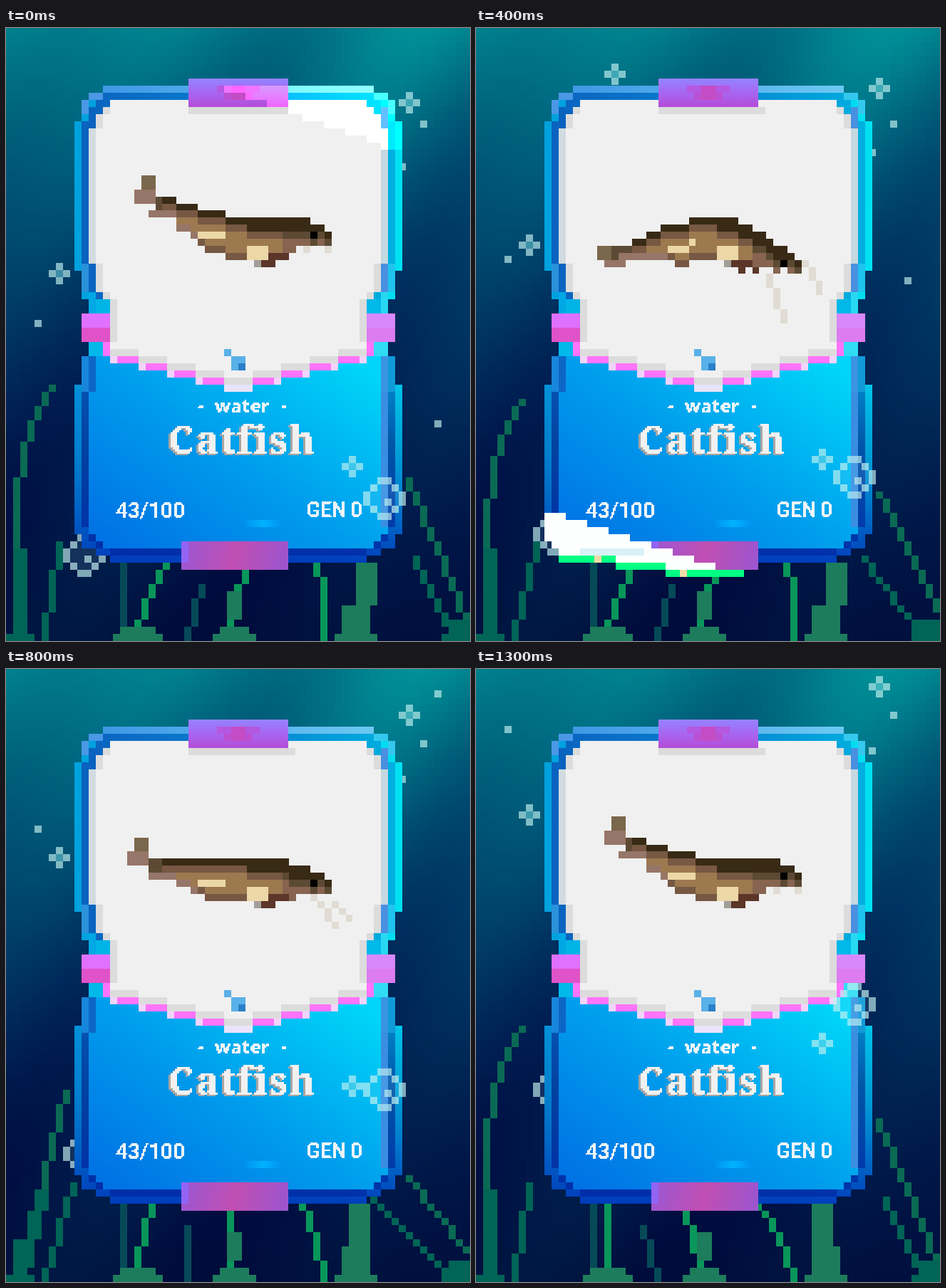
These frames come from a looping animation (651 by 861 pixels, 1.5 s). An HTML page with a canvas:

```html
<!DOCTYPE html>
<html lang="en">
<head>
<meta charset="utf-8">
<title>Catfish card</title>
<style>
html, body { margin: 0; width: 100%; height: 100%; overflow: hidden; background: #00204f; }
canvas { display: block; width: 651px; height: 861px; }
</style>
</head>
<body>
<canvas id="stage" width="651" height="861"></canvas>
<script>
const W = 651, H = 861, LOOP = 1500;
const g = document.getElementById('stage').getContext('2d');

// Grids: origin x, origin y, cell width, cell height
const SEA = [0, 0, W / 65, H / 86];
const CARD = [6, 1, 10, 10];
const FISH = [170, 207, 9.89, 9.89];

function box(c, grid, color, x, y, w = 1, h = 1) {
  const [ox, oy, cw, ch] = grid;
  const l = Math.round(ox + x * cw), t = Math.round(oy + y * ch);
  c.fillStyle = color;
  c.fillRect(l, t, Math.round(ox + (x + w) * cw) - l, Math.round(oy + (y + h) * ch) - t);
}

function line(grid, color, x0, y0, x1, y1) {
  const n = Math.max(Math.abs(x1 - x0), Math.abs(y1 - y0), 1);
  for (let k = 0; k <= n; k++) {
    box(g, grid, color, Math.round(x0 + (x1 - x0) * k / n), Math.round(y0 + (y1 - y0) * k / n));
  }
}

function layer(paint) {
  const cv = document.createElement('canvas');
  cv.width = W;
  cv.height = H;
  paint(cv.getContext('2d'));
  return cv;
}

function lin(c, x0, y0, x1, y1, ...colors) {
  const grad = c.createLinearGradient(x0, y0, x1, y1);
  colors.forEach((k, i) => grad.addColorStop(i / (colors.length - 1), k));
  return grad;
}

// Left side of a stepped outline in card cells, mirrored to the right
function outline(list) {
  const half = list.split(',').map(s => s.split(' ').map(Number));
  const left = [half[0]];
  for (let i = 1; i < half.length; i++) left.push([half[i - 1][0], half[i][1]], half[i]);
  const path = new Path2D();
  left.concat(left.map(([x, y]) => [64 - x, y]).reverse())
    .forEach(([x, y]) => path.lineTo(6 + x * 10, 1 + y * 10));
  path.closePath();
  return path;
}

const RIM = outline('13 8,11 9,10 10,9 13,10 34,11 38,10 40,11 44,10 46,9 50,10 71,12 73,14 74,14 75');
const INNER = outline('13 9,12 10,11 11,10 13,11 33,12 37,14 38,12 44,11 46,10 50,11 70,12 72,14 73,14 74');
const WATER = outline('14 44,13 45,12 46,12 50,11 51,11 70,12 71,13 72,14 73');
const PANEL = outline('14 10,13 11,12 12,11 14,12 33,13 37,14 38,14 45');

// Deep water with slanted rays
const sea = layer(c => {
  const wave = (t, period) => Math.cos((t - 570) / period * 2 * Math.PI);
  for (let y = 0; y < 86; y++) {
    const d = y / 85;
    for (let x = 0; x < 65; x++) {
      const t = x * 10 + y * 5.8;
      const ray = (wave(t, 330) + wave(t, 500)) / 2 * (1 - d * .65);
      const green = 16 + 106 * Math.pow(1 - d, 1.65) + ray * 21;
      const blue = 62 + 76 * Math.pow(1 - d, 1.2) + ray * 13;
      box(c, SEA, `rgb(0,${Math.round(Math.max(12, green))},${Math.round(blue)})`, x, y);
    }
  }
});

// Text set on coarse square dots
function dotText(c, str, x, y, font, size, dot, color, gap = 0, wordGap = 0) {
  const t = document.createElement('canvas').getContext('2d');
  const w = 160, h = 50, base = 32;
  t.canvas.width = w;
  t.canvas.height = h;
  t.font = font.replace('SIZE', size / dot + 'px');
  t.letterSpacing = gap / dot + 'px';
  t.wordSpacing = wordGap / dot + 'px';
  t.fillText(str, 4, base);
  const data = t.getImageData(0, 0, w, h).data;
  c.fillStyle = color;
  for (let i = 0; i < w * h; i++) {
    if (data[i * 4 + 3] > 100) {
      c.fillRect(x + (i % w - 4) * dot, y + (Math.floor(i / w) - base) * dot, dot, dot);
    }
  }
}

const card = layer(c => {
  const put = (...a) => box(c, CARD, ...a);
  const pair = (a, b, x, y, w = 1, h = 1) => {
    put(a, x, y, w, h);
    put(b, 64 - x - w, y, w, h);
  };
  const shade = (shape, color, dark) => {
    c.fillStyle = color;
    c.fill(shape);
    c.fillStyle = dark;
    c.fill(shape);
  };
  shade(RIM, lin(c, 96, 0, 556, 0, '#00a2de', '#00a2de', '#00e2f2'),
    lin(c, 0, 440, 0, 750, 'rgba(0,70,190,0)', 'rgba(0,95,190,.5)', 'rgba(0,55,185,.95)'));
  put(lin(c, 136, 0, 516, 0, '#3f98e6', '#6cc8f2'), 13, 8, 38, 1);
  shade(INNER, lin(c, 106, 0, 546, 0, '#0a62bf', '#0a80cf', '#00b0e0'),
    lin(c, 0, 430, 0, 741, 'rgba(0,50,160,0)', 'rgba(0,55,150,.75)', 'rgba(0,42,168,.95)'));

  const blue = '#4a98e6', aqua = '#35c8ee';
  pair(blue, aqua, 11, 9, 2);
  pair(blue, aqua, 10, 10, 1, 2);
  pair('#0a62bf', '#4a90e0', 11, 11, 1, 3);
  pair('#2a92da', '#20c4ee', 10, 33, 1, 4);
  pair('#00a8e4', '#28d8f2', 11, 37, 1, 3);
  pair('#00b4e6', '#00b8ea', 12, 38, 2, 2);
  pair('#00b8ea', '#30dcf4', 11, 44, 2, 2);

  c.fillStyle = lin(c, 190, 770, 430, 430, '#0070e4', '#009cec', '#00d4f8');
  c.fill(WATER);
  pair('#1886dc', '#109ad8', 10, 46, 1, 5);
  pair('#0d66c6', '#3a94e2', 11, 46, 1, 5);
  put('#3a8ee2', 52, 51, 1, 19);
  put(lin(c, 336, 0, 386, 0, '#0094f0', '#00b2ff', '#0094f0'), 33, 69, 5, 1);

  const white = '#f0f0f0', grey = '#dcdcdc', pink = '#ff74fa';
  c.fillStyle = white;
  c.fill(PANEL);
  pair('#d2dce0', '#c6d8e0', 11, 14, 1, 19);
  put('#4a90e0', 52, 33, 1, 4);
  pair(grey, grey, 12, 12, 1, 2);
  pair(grey, grey, 12, 33, 1, 4);
  pair(grey, grey, 13, 11);
  pair(grey, grey, 13, 37);
  pair(grey, grey, 14, 38, 1, 7);
  put(grey, 25, 11, 15, 1);

  // Stepped lower edge of the panel
  for (let x = 14; x < 32; x++) {
    const y = 45 + Math.min(4, Math.floor((x - 14) / 4));
    const trim = x > 29 ? '#e9e4fa' : x % 4 === 2 ? '#f2d4fb' : pink;
    pair(white, white, x, 44, 1, y - 44);
    pair(grey, grey, x, y);
    pair(trim, trim, x, y + 1);
  }
  pair(pink, pink, 13, 44, 1, 2);

  put('#5ab0e8', 30, 45);
  put('#5ab0e8', 31, 46, 2, 2);
  put('#2a80c8', 32, 47);

  pair('#e070ff', '#d888fb', 10, 40, 4, 2);
  pair('#e052c8', '#dc7cf0', 10, 42, 4, 2);
  put(lin(c, 0, 71, 0, 111, '#9484ff', '#a866f0', '#b44cd8'), 25, 7, 14, 4);
  put('#b458e0', 29, 8, 6, 1);
  put('#bb50d2', 30, 9, 4, 1);
  put('#c44cc4', 31, 8, 2, 2);
  put(lin(c, 246, 721, 396, 761, '#9a58d4', '#c04eb2', '#9a56d0'), 24, 72, 15, 4);
  put('#9264f4', 24, 72, 1, 3);
});

const words = layer(c => {
  const pale = '#eef4f8', serif = 'bold SIZE "Noto Serif", serif', plain = '500 SIZE Roboto, sans-serif';
  dotText(c, '- water -', 269, 540, 'bold SIZE "Noto Sans", sans-serif', 26, 2, pale, 0, 9);
  dotText(c, 'Catfish', 225, 600, serif, 54, 3, '#a9a5a2', 2);
  dotText(c, 'Catfish', 228, 598, serif, 54, 3, '#f1f1f1', 2);
  dotText(c, '43/100', 154, 688, plain, 30, 2, pale);
  dotText(c, 'GEN 0', 421, 687, plain, 30, 2, pale, -1);
});

const DEEP = '#0a6a54', BASE = '#006456', LEAF = '#08965a', MOSS = '#1d7c5c', DIM = '#064a58';

// A weed stands on the sea bed; its tip leans away from the root
function weed(root, top, lean, bend, thin, thick = thin) {
  const at = y => Math.round(root + lean * Math.pow(Math.max(0, 85 - y) / (85 - top), bend));
  for (let y = top; y < 86; y++) {
    const a = Math.min(at(y), at(y + 1) + 1), b = Math.max(at(y), at(y + 1) - 1);
    const low = y > 72 && thick !== thin;
    box(g, SEA, low ? thick : thin, a, y, b - a + (low ? 2 : 1));
  }
}

function clump(color, x, w, top) {
  box(g, SEA, color, x + 1, top, w - 1, 85 - top);
  box(g, SEA, color, x, 85, w + 1);
}

function garden(q, lean) {
  weed(16, 75, 0, 1, DIM);
  weed(25, 78, lean, 1, DIM);
  weed(1, Math.round(50 + 2.2 * q * q), 5 - 2 * q + 1.5 * q * q, 5 - q * q, DEEP, BASE);
  weed(5, 72, 2 + q, 1, BASE);
  weed(65 + q, 63 + 2 * q * q, -9 - q, 1, DEEP);
  weed(62, 74, -5 - 3 * q, 1, BASE);
  clump(BASE, 0, 3, 80);
  clump(BASE, 61, 4, 83);

  weed(18, 75, 2 + lean, 1.6, LEAF);
  weed(31, 76, lean, 1.6, LEAF);
  weed(44, 75, lean - 2.6, 1.3, LEAF);
  box(g, SEA, MOSS, 48 + Math.round(lean / 2), 75, 3, 6);
  box(g, SEA, MOSS, 31, 79, 2, 4);
  clump(MOSS, 15, 6, 84);
  clump(MOSS, 29, 5, 84);
  clump(MOSS, 46, 5, 81);
}

const dot = (x, y) => box(g, SEA, 'rgba(196,242,240,.66)', x, y);

function sparkle(x, y) {
  for (const s of [0, 2]) {
    dot(x + 1, y + s);
    dot(x + s, y + 1);
  }
  box(g, SEA, 'rgba(120,220,226,.5)', x + 1, y + 1);
}

function bubble(x, y) {
  box(g, SEA, 'rgba(190,240,250,.1)', x + 1, y + 1, 4, 4);
  for (let i = 0; i < 3; i++) {
    for (const a of [i, 5 - i]) {
      dot(x + a, y + 2 - i);
      dot(x + a, y + 3 + i);
    }
  }
  dot(x + 3, y + 3);
}

const DARK = '#382a15', BROWN = '#775843', TAN = '#9d7950', ROSE = '#967668', CREAM = '#ecd7a7',
  UMBER = '#5c4a34', FIN = '#5b3629', OLIVE = '#7b674c', ASH = '#a39d98', WISP = '#e0dcd4';

// rise: tail end of the back, drop and curve: head end, fluke: x and lift of the tail fin
const poses = [
  { rise: -3, drop: 2, curve: 4, fluke: [2, -3], wisps: [[25, 10, 25, 10], [28, 10, 28, 10]] },
  { rise: 3, drop: 6, curve: 1.3, fluke: [0, 1], wisps: [[24, 14, 26, 20], [29, 12, 31, 16]] },
  { rise: 0, drop: 3, curve: 2, fluke: [1, -3], wisps: [[26, 11, 29, 15], [29, 12, 31, 14]] }
];

function fish({ rise, drop, curve, fluke: [fx, lift], wisps }) {
  const back = x => Math.floor(6.4 + rise * Math.pow(Math.max(0, 16 - x) / 11, 1.5)
    + drop * Math.pow(Math.max(0, x - 18) / 10, curve));
  const girth = x => Math.round(1.9 + 4.5 * Math.sin((x - 3) / 26 * Math.PI));
  const put = (color, x, y, w, h) => box(g, FISH, color, x, y, w, h);
  const mark = (color, x, depth, w = 1) => {
    for (let i = x; i < x + w; i++) put(color, i, back(i) + depth);
  };

  const tail = back(5) + lift, side = lift < 0 ? -1 : 1;
  put(OLIVE, fx, tail, 2, 2);
  put(ROSE, fx + side, tail + 2, 3, side < 0 ? 2 : 1);
  put(UMBER, fx + 2, back(5) + (side > 0), 5 - fx - 2, 2);
  put(ROSE, 3, back(5) + 2, 3, 1);

  for (const w of wisps) line(FISH, WISP, ...w);
  for (let x = 5; x < 29; x++) {
    const n = girth(x), dark = x < 17 || x > 26 ? 1 : 2;
    for (let i = 0; i < n; i++) {
      let color = TAN;
      if (i < dark) color = DARK;
      else if (x > 21) color = i === dark ? UMBER : '#87644f';
      else if (i === n - 1) color = x < 10 ? ROSE : BROWN;
      else if (i === dark) color = BROWN;
      mark(color, x, i);
    }
  }
  mark(CREAM, 10, 3, 4);
  mark(CREAM, 17, 4, 3);
  mark(CREAM, 17, 5, 3);
  mark(FIN, 20, 5, 3);
  mark(FIN, 19, 6, 2);
  mark(ASH, 18, 6);
  put('#000', 26, back(27) + 1);
}

// Diagonal band of light running down the card
function shine(step) {
  if (step > 3) return;
  g.save();
  g.clip(RIM);
  g.globalCompositeOperation = 'color-dodge';
  for (let x = 9; x < 55; x++) {
    const low = Math.round(12 + 18.5 * step + (x - 39.4) * .36);
    box(g, CARD, '#404040', x, low - 14, 1, 14);
  }
  g.restore();
}

// The band leaves past the lower left corner
function splash() {
  for (let x = 9; x < 37; x++) {
    const top = 68 + Math.floor((x - 9) * .34);
    const end = Math.floor(Math.min(63 + x, 74 + (x - 11) * .14, 76));
    if (end > top) box(g, CARD, '#fdfefe', x, top, 1, end - top);
    if (x > 13 && x < 23) box(g, CARD, '#d8f2f6', x, 73);
    if (x > 10) box(g, CARD, x % 12 === 4 ? '#f0dca8' : '#00ff82', x, end);
  }
}

// Rising things gain speed with each beat
const rise = (y, speed, gain, n) => Math.round(y - speed * n - gain * n * n);

function draw(step) {
  const beat = Math.floor(step / 3), slow = Math.floor(step / 5);
  const pose = 2 - Math.abs(2 - beat);
  const skip = step > 11 ? 1 : 0;
  g.drawImage(sea, 0, 0);
  garden(pose, 2 - 2 * slow);

  sparkle(6, 33 - step - skip);
  sparkle(55, 9 - 2 * beat);
  if (step < 7) sparkle(18, 13 - 2 * step);
  dot(55, 19 - 2 * beat);
  dot(58, 13 - Math.floor(3.5 * slow));
  dot(4, rise(41, 2, .04, Math.min(13, step + skip)));
  dot(60, rise(55, 3.4, .38, step));
  bubble(8, rise(71, 2.6, .3, beat));

  g.drawImage(card, 0, 0);
  shine(step);
  fish(poses[pose]);
  g.drawImage(words, 0, 0);
  if (step === 4) splash();
  sparkle(47, rise(60, .8, .37, beat));
  bubble(50, rise(63, 2.3, .6, beat));
}

const start = performance.now();
let shown = -1;
function tick(now) {
  const t = Math.max(0, now - start) % LOOP;
  const step = Math.min(13, Math.floor(t / 100));
  if (step !== shown) draw(shown = step);
  requestAnimationFrame(tick);
}
tick(start);
</script>
</body>
</html>
```
